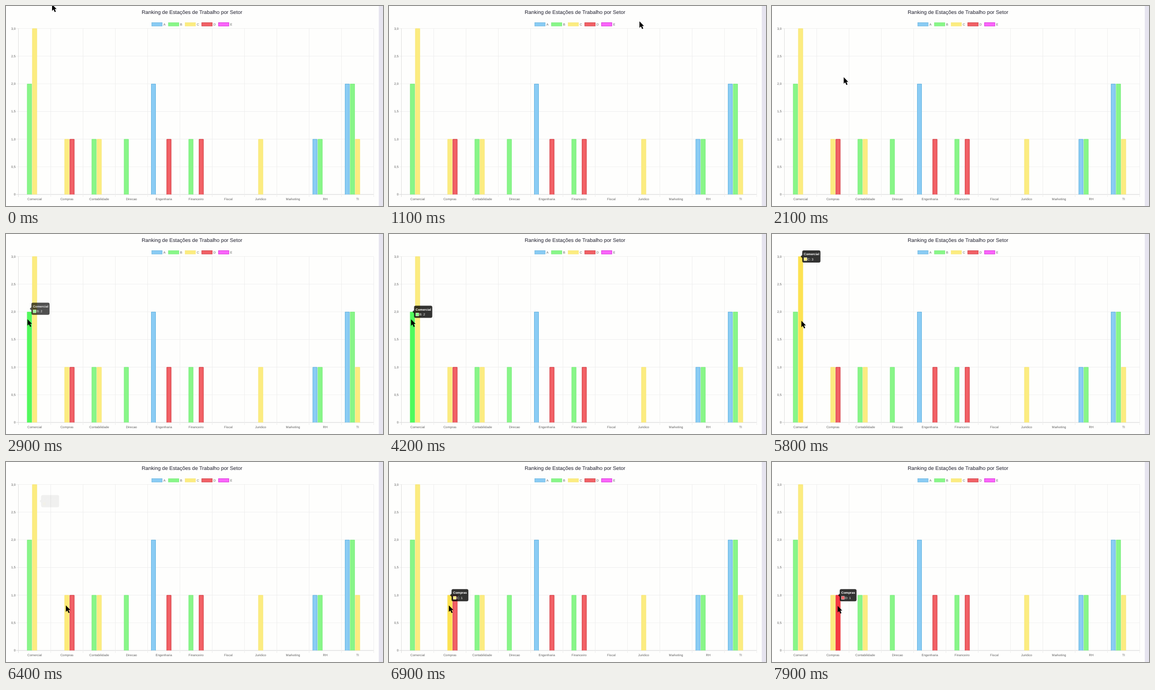
Animation of 712x378 px, one loop 8000 ms. Source, as an HTML page:

```html
<!DOCTYPE html>
<html lang="pt">
<head>
<meta charset="utf-8">
<title>Ranking por setor</title>
<style>
  html, body { margin: 0; width: 100%; height: 100%; overflow: hidden; background: #fefefd; }
  svg { display: block; width: 712px; height: 378px; }
  text { font-family: "Liberation Sans", Arial, sans-serif; text-rendering: geometricPrecision; }
  .label { font-size: 6.1px; fill: #636363; }
  .tip text { font-size: 6px; fill: #fff; }
  .tip .head { font-weight: bold; }
</style>
</head>
<body>
<svg id="stage" viewBox="0 0 712 378"></svg>
<script>
const LOOP = 8000, STEP = 100, SLIDE = 400, FADE = 240;
const LEFT = 23.5, TOP = 42.5, BASE = 356.2, CAT = 61, UNIT = (BASE - TOP) / 3;
const SLOT = CAT * 0.8 / 5, BAR = SLOT * 0.9;

const series = [
  { name: 'A', fill: '#8accf4', line: '#5fb0de', hover: '#5cb8f0' },
  { name: 'B', fill: '#88f688', line: '#7aec7e', hover: '#50fa5c' },
  { name: 'C', fill: '#fcec80', line: '#f7e676', hover: '#fde252' },
  { name: 'D', fill: '#f26166', line: '#cb3038', hover: '#f63a42' },
  { name: 'E', fill: '#fb66fb', line: '#d414d4', hover: '#fb33fb' }
];

// One digit per series A to E
const counts = {
  Comercial: '02300', Compras: '00110', Contabilidade: '01100', Direcao: '01000',
  Engenharia: '20010', Financeiro: '01010', Fiscal: '00000', Juridico: '00100',
  Marketing: '00000', RH: '11000', TI: '22100'
};
const sectors = Object.keys(counts);

// Pointer moves: begin, end, x, y, bend of the path
const home = [87, -3];
const moves = [
  [0, 800, 525, 4, 17],
  [1000, 1100, 473, 29, 0],
  [1500, 2340, 52, 184, -32],
  [2400, 2900, 40.5, 161, 0],
  [4100, 4700, 55.5, 164, 0],
  [5800, 6400, 113, 271, 0],
  [7300, 7700, 124, 272, 0]
];

// Hovered bar; without a sector the tooltip leaves
const hovers = [
  { at: 2695, sector: 'Comercial', s: 1 },
  { at: 4402, sector: 'Comercial', s: 2 },
  { at: 5960 },
  { at: 6384, sector: 'Compras', s: 2 },
  { at: 7500, sector: 'Compras', s: 3 }
];

const clamp = v => Math.max(0, Math.min(1, v));
const lerp = (a, b, p) => a + (b - a) * p;
const easeOut = p => 1 - (1 - clamp(p)) ** 4;
const smooth = p => p * p * (3 - 2 * p);

function add(parent, tag, attrs, content) {
  const node = document.createElementNS('http://www.w3.org/2000/svg', tag);
  for (const key in attrs) node.setAttribute(key, attrs[key]);
  if (content !== undefined) node.textContent = content;
  return parent.appendChild(node);
}

const stage = document.getElementById('stage');
const rect = (parent, x, y, width, height, fill) => add(parent, 'rect', { x, y, width, height, fill });
const line = (d, stroke) => add(stage, 'path', { d, stroke, 'stroke-width': 0.8, fill: 'none' });
const label = (x, y, anchor, content) =>
  add(stage, 'text', { x, y, class: 'label', 'text-anchor': anchor }, content);

const center = sector => LEFT + CAT * (sectors.indexOf(sector) + 0.5);
const barX = (sector, s) => center(sector) + (s - 2.5) * SLOT + (SLOT - BAR) / 2;
const barY = (sector, s) => BASE - counts[sector][s] * UNIT;

rect(stage, 0, 0, 712, 378, '#fefefd');
rect(stage, 704, 0, 8, 378, '#e6e4ef');
add(stage, 'text', { x: 351.2, y: 15, 'font-size': 9.8, fill: '#20202e', 'text-anchor': 'middle' },
  'Ranking de Estações de Trabalho por Setor');

series.forEach((s, j) => {
  const x = 274.8 + 31.5 * j;
  add(stage, 'rect', { x: x + 0.5, y: 31.5, width: 19.6, height: 6.4, fill: s.fill, stroke: s.line, 'stroke-width': 0.8 });
  label(x + 22.5, 36.8, 'start', s.name);
});

for (let i = 0; i <= 6; i++) {
  const y = BASE - i * UNIT / 2;
  line(`M19 ${y}H694.5`, i ? '#ececec' : '#cfcfcf');
  label(18.2, y + 2.1, 'end', i ? (i / 2).toFixed(1).replace('.', ',') : '0');
}
for (let i = 0; i <= sectors.length; i++) {
  line(`M${LEFT + i * CAT} ${TOP}V361`, i ? '#ececec' : '#dadada');
}

const glow = {};
for (const sector of sectors) {
  label(center(sector), 367.2, 'middle', sector);
  series.forEach((s, j) => {
    if (counts[sector][j] === '0') return;
    const x = barX(sector, j), y = barY(sector, j);
    rect(stage, x, y, BAR, BASE - y, s.fill);
    line(`M${x + 0.4} ${BASE}V${y + 0.4}h${BAR - 0.8}V${BASE}`, s.line);
    glow[sector + j] = rect(stage, x, y, BAR, BASE - y, s.hover);
  });
}

const tip = add(stage, 'g', { class: 'tip' });
const panel = add(tip, 'path', { fill: '#000', 'fill-opacity': 0.8 });
const head = add(tip, 'text', { x: 3, y: 9, class: 'head' });
rect(tip, 3, 13.4, 6.2, 6.2, '#fff');
const swatch = rect(tip, 3.5, 13.9, 5.2, 5.2, '#fff');
const body = add(tip, 'text', { x: 10, y: 18.7 });

const pointer = add(stage, 'path', { d: 'M0 0V12.2L2.8 9.6L5 14.6L7.2 13.6L5 8.8H8.6Z' });

function pointerAt(t) {
  let [x, y] = home;
  for (const [begin, end, toX, toY, bend] of moves) {
    const p = smooth(clamp((t - begin) / (end - begin)));
    x = lerp(x, toX, p);
    y = lerp(y, toY, p) + bend * Math.sin(Math.PI * p);
  }
  return [x, y];
}

// Left, top and width of the tooltip beside a bar
function tipBox({ sector, s }) {
  return [barX(sector, s) + BAR / 2 + 3.1, barY(sector, s) - 11.5, sector === 'Compras' ? 31.8 : 34.4];
}

function drawPanel(w) {
  panel.setAttribute('d',
    `M3 0H${w - 3}q3 0 3 3V20q0 3 -3 3H3q-3 0 -3 -3V14.5L-3 11.5L0 8.5V3q0 -3 3 -3Z`);
}

function drawTip({ at, sector, s }, from, to, t) {
  const p = easeOut((t - at) / SLIDE);
  const [x, y, w] = from.map((v, i) => lerp(v, to[i], p));
  tip.setAttribute('transform', `translate(${x} ${y})`);
  drawPanel(w);
  head.textContent = sector;
  body.textContent = `${series[s].name}: ${counts[sector][s]}`;
  swatch.setAttribute('fill', series[s].fill);
}

function drawHover(t) {
  let from, to = tipBox({ sector: 'Comercial', s: 2 });
  let current = null, shown = false, alpha = 0;
  const heat = {};
  for (const hover of hovers.filter(h => h.at <= t)) {
    const age = t - hover.at, fade = clamp(age / FADE);
    for (const key in heat) heat[key] *= 1 - easeOut(age / SLIDE);
    if (hover.sector) {
      heat[hover.sector + hover.s] = easeOut(age / SLIDE);
      alpha = shown ? 1 : fade;
      from = to;
      to = tipBox(hover);
      current = hover;
    } else {
      alpha = 1 - fade;
    }
    shown = !!hover.sector;
  }
  for (const key in glow) glow[key].setAttribute('opacity', heat[key] || 0);
  // Each part fades alone, so the text stays faint on a faint panel
  for (const part of tip.children) part.setAttribute('opacity', alpha);
  if (current) drawTip(current, from, to, t);
}

function draw(t) {
  drawHover(t);
  pointer.setAttribute('transform', `translate(${pointerAt(t)})`);
}

const start = performance.now();
function tick() {
  const t = (performance.now() - start) % LOOP;
  draw(Math.floor(t / STEP) * STEP);
  requestAnimationFrame(tick);
}
tick();
</script>
</body>
</html>
```
